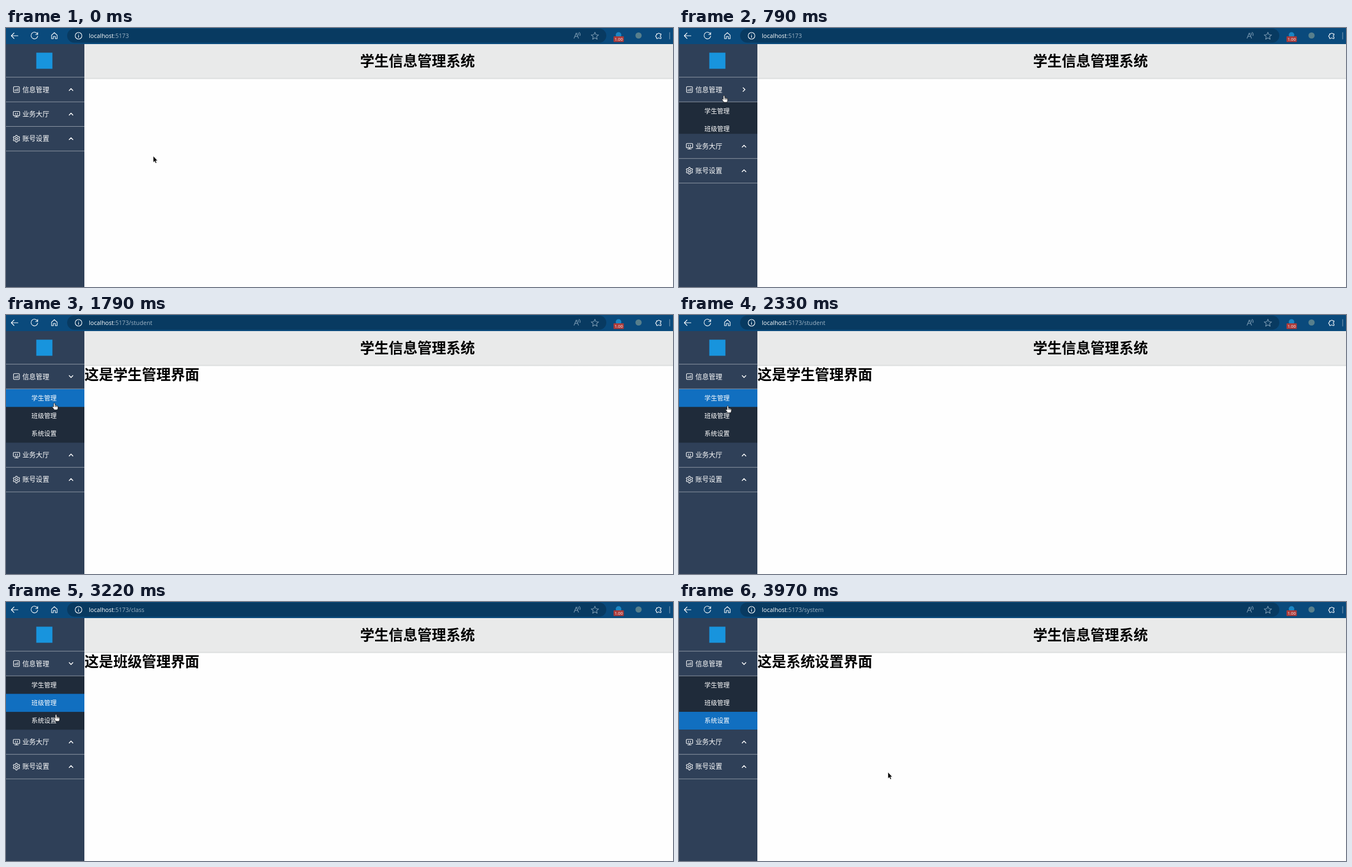
An HTML page for the animation above (4000 ms loop, 1200 by 467 pixels).

```html
<!DOCTYPE html>
<html lang="zh-CN">
<head>
<meta charset="utf-8">
<title>学生信息管理系统</title>
<style>
  html, body { margin: 0; width: 100%; height: 100%; overflow: hidden; background: #fff; }
  svg { display: block; width: 1200px; height: 467px; }
  text { font-family: "Noto Sans CJK SC", "Noto Sans CJK", sans-serif; white-space: pre; }
  .url, .badge { font-family: "Open Sans", "Noto Sans", sans-serif; }
  .title { font-size: 25.85px; font-weight: 700; }
  .item { font-size: 12.1px; fill: #fff; }
  .sub { font-size: 11.35px; fill: #fff; }
  .icon { fill: none; stroke: #fff; stroke-width: 1.1; stroke-linecap: round; stroke-linejoin: round; }
  .dim { stroke: #7e9db5; }
  .rule { stroke: #8f99a5; stroke-width: 1; }
</style>
</head>
<body>
<svg viewBox="0 0 1200 467">
  <defs>
    <linearGradient id="shade" x2="0" y2="1">
      <stop stop-color="#cfd2d2"/><stop offset="1" stop-color="#fff"/>
    </linearGradient>
    <clipPath id="subClip"><rect id="subWindow" y="133" width="141"/></clipPath>
  </defs>

  <rect width="1200" height="467" fill="#fefefe"/>
  <rect x="141" y="29" width="1059" height="61" fill="#e9eaea"/>
  <rect x="141" y="90" width="1059" height="3" fill="url(#shade)"/>
  <text class="title" x="636.9" y="69.4">学生信息管理系统</text>
  <text class="title" id="heading" x="141.2" y="117.4"></text>

  <!-- browser bar -->
  <rect width="1200" height="29" fill="#0a4a7c"/>
  <rect x="110" y="1" width="970" height="25.5" rx="12.7" fill="#083a61"/>
  <g class="icon">
    <path d="M21.5 14H9.5M14.5 9L9.5 14L14.5 19"/>
    <path d="M56.6 11.2A6 6 0 1 0 57 14.6M57 8V11.7H53.2"/>
    <path d="M82 13L87 8.3L92 13V19.3H88.8V15.3H85.2V19.3H82Z"/>
    <circle cx="130.5" cy="14" r="6"/>
    <path d="M130.5 13.4V17M130.5 11V11.1"/>
    <path d="M1170.4 10.6H1172.6A1.9 1.9 0 0 1 1176.2 10.6H1178.4V13A1.5 1.5 0 0 0 1178.4 16V19H1176.2A1.9 1.9 0 0 0 1172.6 19H1170.4V16.3A1.6 1.6 0 0 1 1170.4 13Z"/>
  </g>
  <g class="icon dim">
    <path d="M1022 18.5L1026 9L1030 18.5M1023.4 15.3H1028.6M1029 9.2Q1030.6 11 1029.8 13M1031.2 7.8Q1034 10.6 1032.6 13.8"/>
    <path id="star"/>
    <path d="M1194 8V20"/>
  </g>
  <circle cx="1102" cy="12.5" r="5" fill="#1b86c4"/>
  <rect x="1093" y="15" width="18.5" height="10.3" rx="1" fill="#a93a3a"/>
  <text class="badge" x="1102.2" y="23" font-size="7.6" fill="#fff" text-anchor="middle">1.00</text>
  <circle cx="1138" cy="13.5" r="5.6" fill="#577f8c"/>
  <text class="url" x="149" y="17.8" font-size="10.7" fill="#fff">localhost<tspan id="path" fill="#9fb4c5"></tspan></text>

  <!-- sidebar -->
  <rect y="29" width="141" height="438" fill="#2f4058"/>
  <rect x="54.5" y="44.5" width="29" height="29" fill="#1894dd"/>
  <path class="rule" d="M0 88.7H141"/>
  <g clip-path="url(#subClip)">
    <rect y="133" width="141" height="98" fill="#1f2b3a"/>
    <rect id="active" width="141" height="32.5" fill="#116fc0"/>
    <g id="subs"></g>
  </g>
  <g id="items"></g>

  <circle id="press" r="9.7" fill="#ffe600" opacity=".6"/>
  <path id="arrow" d="M0 0V11.2L2.5 8.9L4.2 12.8L6 12L4.4 8.2H7.6Z" fill="#000" stroke="#fff" stroke-width=".5"/>
  <path id="hand" d="M-1.3 .9Q-1.2 -.4 0 -.3Q1.1 -.2 1.2 .9V4Q2.2 3.4 3 4.3Q4.2 3.8 4.8 4.8Q6.4 4.5 6.5 6V8.6Q6.3 10.3 5.4 12H-.3Q-1.6 9.6 -3.4 7.6Q-4 6.2 -2.8 6Q-2 6.1 -1.3 7Z M1.4 4.6V7M3.2 5V7M4.9 5.4V7.2"
    fill="#fff" stroke="#111" stroke-width=".8" stroke-linejoin="round"/>
</svg>
<script>
  const $ = id => document.getElementById(id);
  const LOOP = 4000, ROW = 32.4, SUB_TOP = 133.2, SUB_HEIGHT = 97.2, PITCH = 44.3;

  const starPoint = (_, i) => {
    const r = i % 2 ? 3.2 : 7, a = i * Math.PI / 5;
    return `${1059.5 + r * Math.sin(a)} ${14.6 - r * Math.cos(a)}`;
  };
  $('star').setAttribute('d', 'M' + Array.from({ length: 10 }, starPoint).join('L') + 'Z');

  // Gear outline in polar form, six soft teeth.
  const gearPoint = (_, i) => {
    const a = i * Math.PI / 36, r = 5.3 + .8 * Math.tanh(3 * Math.cos(6 * a));
    return `${18.8 + r * Math.sin(a)} ${r * Math.cos(a)}`;
  };
  const gear = 'M' + Array.from({ length: 72 }, gearPoint).join('L') + 'Z';

  const menu = [
    ['信息管理', '<rect x="13.5" y="-5.2" width="10.6" height="10.4" rx="1.4"/><path d="M16.3 0V2.4M18.8 -1V2.4M21.3 -2.2V2.4"/>'],
    ['业务大厅', '<rect x="13.2" y="-4.8" width="11.4" height="7.6" rx="1"/><path d="M18.9 2.8V5M15.8 5.2H22M17.2 -2V.4M20.6 -2V.4"/>'],
    ['账号设置', `<path d="${gear}"/><circle cx="18.8" r="2"/>`]
  ];
  $('items').innerHTML = menu.map(([label, icon]) => `<g>
    <g class="icon">${icon}</g>
    <text class="item" x="29.4" y="4.5">${label}</text>
    <g transform="translate(117 0)"><path class="icon chevron" style="stroke-width:1.5" d="M-3.3 1.7L0 -1.7L3.3 1.7"/></g>
    <path class="rule" d="M0 22.2H141"/></g>`).join('');
  const items = [...$('items').children];
  const chevron = document.querySelector('.chevron');

  $('subs').innerHTML = ['学生管理', '班级管理', '系统设置'].map((label, i) =>
    `<text class="sub" x="45.8" y="${153.6 + i * ROW}">${label}</text>`).join('');

  const pages = [
    { at: 0, path: '', heading: '', row: -1 },
    { at: 1760, path: '/student', heading: '这是学生管理界面', row: 0 },
    { at: 2770, path: '/class', heading: '这是班级管理界面', row: 1 },
    { at: 3640, path: '/system', heading: '这是系统设置界面', row: 2 }
  ];
  const presses = [[570, 660], [1670, 1790], [2710, 2800], [3550, 3640]];
  // time, x, y of the pointer tip
  const track = [
    [30, 265, 231], [480, 81, 122], [1220, 81, 122], [1370, 86, 145], [1520, 87, 159],
    [2270, 87, 159], [2530, 90, 181], [3100, 90, 181], [3220, 90, 203], [3520, 90, 213],
    [3820, 90, 213], [3970, 376, 307]
  ];

  const clamp = v => Math.min(1, Math.max(0, v));
  const smooth = v => v * v * (3 - 2 * v);
  const ease = (t, from, to) => smooth(clamp((t - from) / (to - from)));
  const move = (el, x, y) => el.setAttribute('transform', `translate(${x} ${y})`);
  const show = (el, on) => el.setAttribute('visibility', on ? 'visible' : 'hidden');

  function pointer(t) {
    const next = track.findIndex(key => key[0] > t);
    if (next === 0) return track[0].slice(1);
    if (next < 0) return track[track.length - 1].slice(1);
    const [t0, x0, y0] = track[next - 1], [t1, x1, y1] = track[next];
    const k = next === 1 ? ease(t, t0, t1) : (t - t0) / (t1 - t0);
    return [x0 + (x1 - x0) * k, y0 + (y1 - y0) * k];
  }

  function render(t) {
    const height = SUB_HEIGHT * ease(t, 640, 908);
    $('subWindow').setAttribute('height', height);
    items.forEach((item, i) => move(item, 0, 111 + i * PITCH + (i ? height : 0)));
    chevron.setAttribute('transform', `rotate(${180 * ease(t, 650, 930)})`);

    const page = pages.filter(p => p.at <= t).pop();
    $('path').textContent = ':5173' + page.path;
    $('heading').textContent = page.heading;
    show($('active'), page.row >= 0);
    $('active').setAttribute('y', SUB_TOP + page.row * ROW);

    const [x, y] = pointer(t);
    const overMenu = x < 141;
    for (const id of ['press', 'arrow', 'hand']) move($(id), x, y);
    show($('press'), presses.some(([from, to]) => t >= from && t < to));
    show($('arrow'), !overMenu);
    show($('hand'), overMenu);
  }

  function tick() {
    render(performance.now() % LOOP);
    requestAnimationFrame(tick);
  }
  tick();
</script>
</body>
</html>
```
